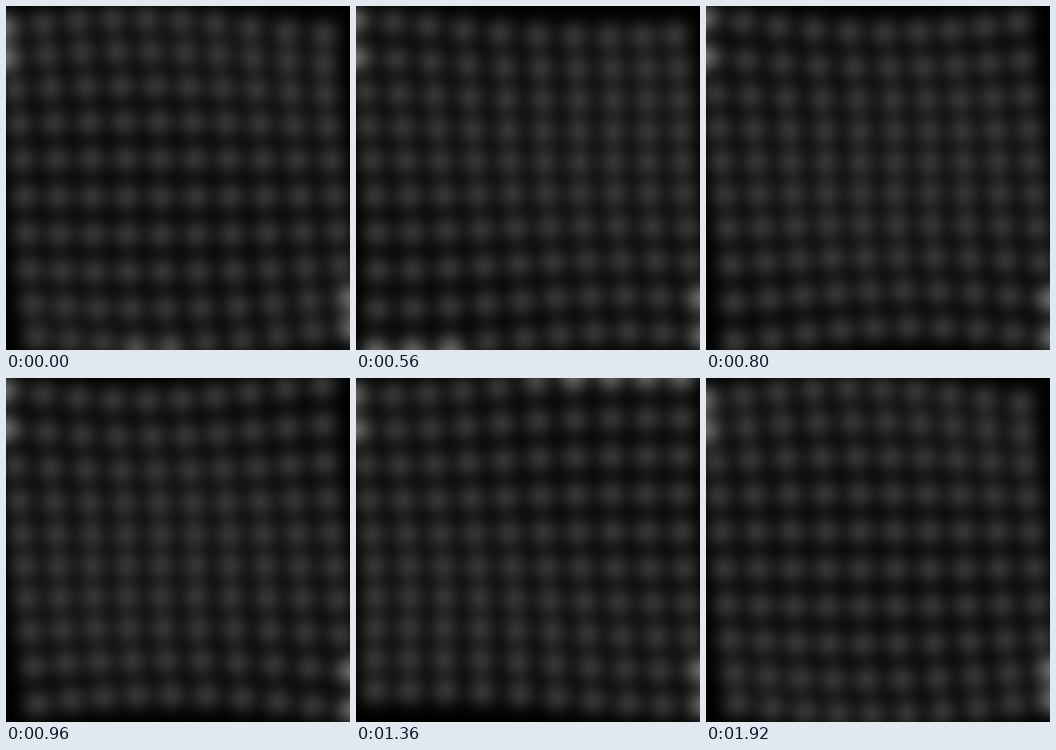
An HTML page with a canvas that plays this animation: 540x540 px, repeating every 2000 ms.

```html
<!DOCTYPE html>
<html>
<head>
<meta charset="utf-8">
<style>
  html, body { margin: 0; width: 100%; height: 100%; overflow: hidden; background: #000; }
  canvas { display: block; width: 540px; height: 540px; }
</style>
</head>
<body>
<canvas id="stage" width="540" height="540"></canvas>
<script>
const SIZE = 540, PAD = 60, COUNT = 10, CELL = SIZE / COUNT;
const LOOP = 2000, STEP = 80;
const SIDE = 19, BLUR = 16;
const REACH = 5;                   // swing length per row away from the middle
const SWING = 42 * Math.PI / 180;  // turn given by each of the two waves
const WAVE = 0.4, START = 24 * Math.PI / 180;

function makeCanvas(size) {
  const c = document.createElement('canvas');
  c.width = c.height = size;
  return c;
}

const screen2d = document.getElementById('stage').getContext('2d');
const tiles = makeCanvas(SIZE), padded = makeCanvas(SIZE + 2 * PAD);
const tiles2d = tiles.getContext('2d'), padded2d = padded.getContext('2d');

// [source start, source length, target start, target length]
const BANDS = [
  [0, 1, 0, PAD],
  [0, SIZE, PAD, SIZE],
  [SIZE - 1, 1, PAD + SIZE, PAD]
];

function drawTiles(phase) {
  tiles2d.fillStyle = '#000';
  tiles2d.fillRect(0, 0, SIZE, SIZE);
  tiles2d.fillStyle = '#fff';
  for (let row = 0; row < COUNT; row++) {
    for (let col = 0; col < COUNT; col++) {
      const u = col - (COUNT - 1) / 2, v = row - (COUNT - 1) / 2;
      const angle = SWING * (Math.cos(phase + WAVE * u) + Math.cos(phase - WAVE * v));
      const x = SIZE / 2 + u * CELL + v * REACH * Math.cos(angle);
      const y = SIZE / 2 + v * CELL + v * REACH * Math.sin(angle);
      tiles2d.fillRect(x - SIDE / 2, y - SIDE / 2, SIDE, SIDE);
    }
  }
}

// Repeat the border pixels outwards so the blur brightens tiles cut by an edge.
function extendEdges() {
  padded2d.imageSmoothingEnabled = false;
  for (const [sx, sw, dx, dw] of BANDS) {
    for (const [sy, sh, dy, dh] of BANDS) {
      padded2d.drawImage(tiles, sx, sy, sw, sh, dx, dy, dw, dh);
    }
  }
}

function render(time) {
  const t = Math.floor((time % LOOP) / STEP) * STEP;
  drawTiles(START + 2 * Math.PI * t / LOOP);
  extendEdges();
  screen2d.filter = 'none';
  screen2d.fillStyle = '#000';
  screen2d.fillRect(0, 0, SIZE, SIZE);
  screen2d.filter = `blur(${BLUR}px)`;
  screen2d.drawImage(padded, -PAD, -PAD);
}

const begin = performance.now();
function tick() {
  render(performance.now() - begin);
  requestAnimationFrame(tick);
}
tick();
</script>
</body>
</html>
```
